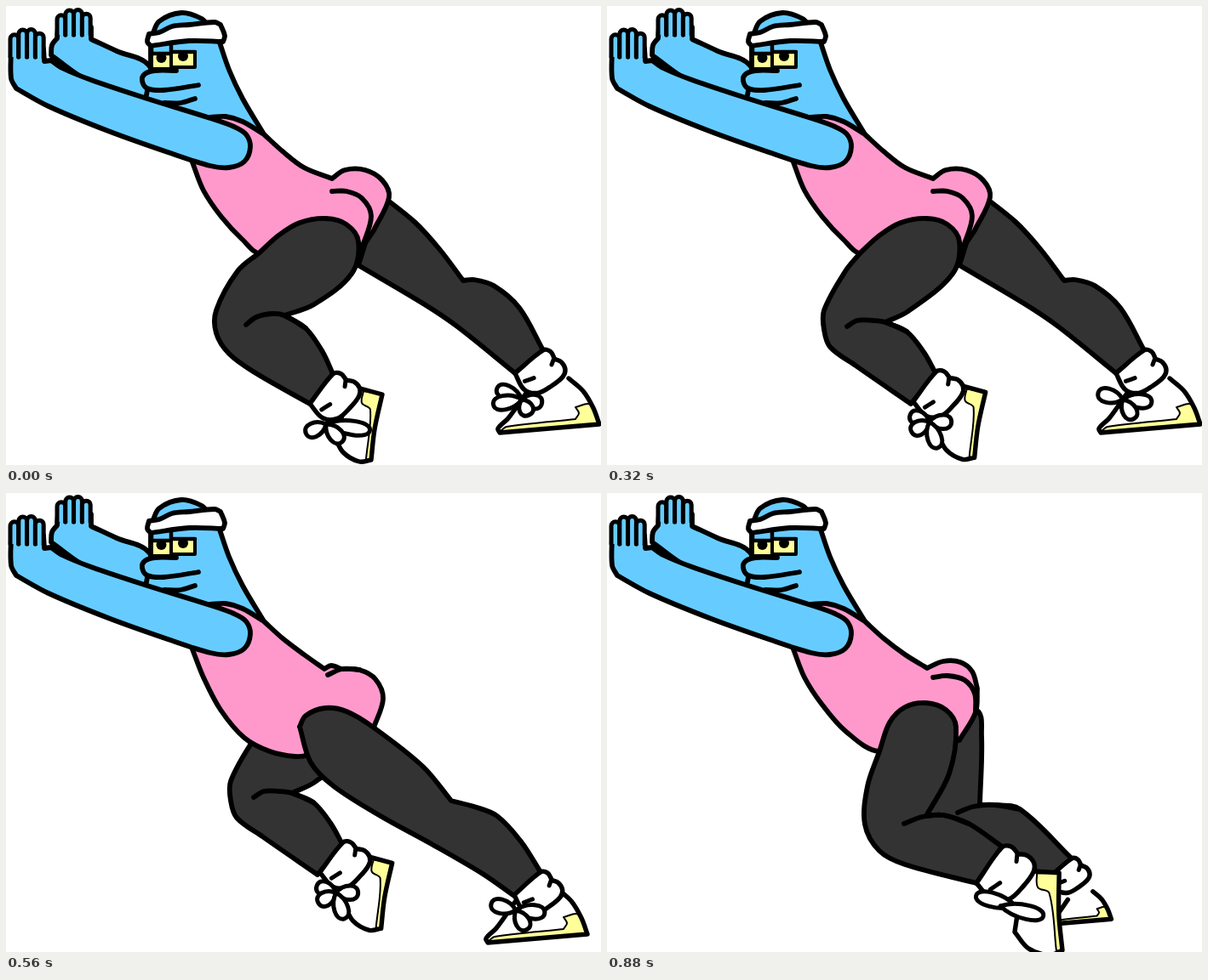
Recreate the animation shown at these times as an HTML page with a canvas. Size 699 by 540 pixels, loop 960 ms.

```html
<!DOCTYPE html>
<html lang="en">
<head>
<meta charset="utf-8">
<title>Skater</title>
<style>
  html, body { margin: 0; width: 100%; height: 100%; overflow: hidden; background: #fff; }
  canvas { display: block; }
</style>
</head>
<body>
<canvas id="stage" width="699" height="540"></canvas>
<script>
const ctx = document.getElementById('stage').getContext('2d');
const BLUE = '#66ccff', PINK = '#ff99cc', DARK = '#333333', YELLOW = '#ffff99', WHITE = '#ffffff', BLACK = '#000000';
const STEP = 80, HALF = 6;
const rad = degrees => degrees * Math.PI / 180;
let zoom = 1;

// Smooth curve through "x,y" key points; a slash makes a sharp corner.
function trace(text) {
  const path = new Path2D();
  let last = null;
  for (const part of text.split('/')) {
    const run = part.trim().split(/\s+/).map(pair => pair.split(',').map(Number));
    if (last) run.unshift(last); else path.moveTo(...run[0]);
    const handle = (i, reach) => {
      const [x0, y0] = run[Math.max(i - 1, 0)];
      const [x1, y1] = run[Math.min(i + 1, run.length - 1)];
      const k = reach / (Math.hypot(x1 - x0, y1 - y0) || 1);
      return [run[i][0] + (x1 - x0) * k, run[i][1] + (y1 - y0) * k];
    };
    for (let i = 0; i < run.length - 1; i++) {
      const [a, b] = [run[i], run[i + 1]];
      const reach = Math.hypot(b[0] - a[0], b[1] - a[1]) / 3;
      path.bezierCurveTo(...handle(i, reach), ...handle(i + 1, -reach), ...b);
    }
    last = run[run.length - 1];
  }
  return path;
}

const toPath = outline => typeof outline === 'string' ? trace(outline) : outline;

function fill(outline, color) {
  ctx.fillStyle = color;
  ctx.fill(toPath(outline));
}

function line(outline, width = 5.8) {
  ctx.lineWidth = width / zoom;
  ctx.stroke(toPath(outline));
}

function shape(outline, color, width) {
  const path = toPath(outline);
  fill(path, color);
  line(path, width);
}

// Line widths stay the same however the part is scaled.
function placed(x, y, draw, angle = 0, scale = 1) {
  ctx.save();
  ctx.translate(x, y);
  ctx.rotate(rad(angle));
  ctx.scale(scale, scale);
  zoom *= scale;
  draw();
  zoom /= scale;
  ctx.restore();
}

function drawShoe(upper, sole) {
  fill(upper, WHITE);
  shape(sole, YELLOW, 2);
  line(upper, 5.4);
}

// Both shoes have the tip of the toe at the origin.
const sideShoe = () => drawShoe(
  '83,-62 100,-47 112,-27 119,-8 / 2,2 / 0,-3 12,-15 34,-46',
  '4,-1 10,-5 91,-14 / 95,-21 91,-28 / 109,-31 119,-8 / 2,2');
const heelShoe = () => drawShoe(
  '-20,-86 13,-77 / 4,-36 0,0 / -14,2 -33,-9 -43,-28 / -34,-52',
  '-9,-81 -11,-67 -1,-59 -6,-1 / 0,0 4,-36 13,-77 / -9,-81');

// The sock hangs from the two corners of the ankle.
function drawSock(ax, ay, bx, by) {
  const angle = Math.atan2(by - ay, bx - ax) * 180 / Math.PI;
  placed(ax, ay, () => {
    shape('0,0 / 44,0 50,7 48,17 / 52,25 50,35 42,40 25,40 6,36 -4,22 0,0', WHITE, 5.4);
    line('48,16 41,20', 5);
    line('3,15 14,19', 5);
  }, angle, Math.hypot(bx - ax, by - ay) / 44);
}

// Lace loops as [angle, length] around the knot.
function drawBow(x, y, loops) {
  for (const [angle, length] of loops) {
    placed(x, y, () => {
      const petal = new Path2D();
      petal.bezierCurveTo(0, 0, 0, 0, 0, 0);
      petal.bezierCurveTo(length * 0.35, -11, length, -11, length, 0);
      petal.bezierCurveTo(length, 11, length * 0.35, 11, 0, 0);
      shape(petal, WHITE, 5);
    }, angle);
  }
}

// Laces fly up, fall level and drop, over and over.
const flatBows = [
  [[205, 32], [170, 34], [10, 24], [65, 20]],
  [[195, 30], [5, 34], [60, 26]],
  [[195, 30], [70, 30]]
];
const bentBows = [
  [[155, 26], [8, 52], [48, 28]],
  [[200, 24], [150, 24], [0, 26], [72, 32]],
  [[150, 32], [-5, 24], [25, 26]]
];

function drawBentLeg(beat) {
  const lift = beat ? 8 : 0;
  shape(`298,290 320,270 345,255 376,250 400,257 414,277 406,315 ${362 - lift},${351 + lift} 327,${364 + lift}
    / 352,${379 + lift / 2} 372,407 ${384 + lift / 3},433 / 357,468 / 292,${431 - lift} 262,${409 - lift}
    ${247 + lift},${385 - lift / 2} ${247 + lift},358 ${272 + lift},312 298,290`, DARK);
  line(`282,${375 + lift / 4} 294,${366 + lift / 2} 312,${362 + lift} 327,${364 + lift} 352,${379 + lift / 2}`);
  placed(lift / 3, -lift / 3, () => {
    placed(429, 534, heelShoe);
    drawSock(357, 468, 384, 433);
    drawBow(376, 492, bentBows[beat % 3]);
  });
}

// Collar and back are shared; the hips and belly follow the stride.
function drawTorso(hips, belly, cheek) {
  shape(`240,131 258,130 278,136 303,151 / 325,171 350,190 ${hips} / ${belly} 232,217 219,184 / 240,131`, PINK);
  line(cheek);
}

function strideFar(beat) {
  shape('440,222 480,254 510,287 537,323 / 550,322 573,329 603,355 631,405 / 598,432 / 530,377 490,350 414,305 / 440,222', DARK);
  placed(578, 500, sideShoe);
  drawSock(598, 432, 631, 405);
  drawBow(606, 463, flatBows[beat % 3]);
  drawTorso('383,203 / 398,193 422,193 442,205 450,225 432,264 / 418,285',
    '300,292 278,275 253,248', '383,218 400,218 418,226 429,247 418,285');
  drawBentLeg(beat);
}

function strideNear(beat) {
  placed(9, -19, () => drawBentLeg(beat));
  drawTorso('374,207 / 382,203 394,207 / 415,208 434,219 443,242 432,276',
    '355,308 340,310 310,304 280,288 252,255', '378,214 395,207 415,208');
  shape('345,275 352,262 375,253 400,257 432,276 490,322 523,362 / 550,369 577,380 605,410 628,446 / 597,474 / 560,448 500,413 440,380 385,345 358,317 345,275', DARK);
  placed(564, 527, sideShoe);
  drawSock(597, 473, 628, 446);
  drawBow(599, 491, flatBows[beat % 3]);
}

function drawPassTorso() {
  drawTorso('376,206 / 395,198 415,199 429,210 435,230 / 433,258 414,291',
    '320,304 280,280 252,248', '383,217 400,215 420,220 432,236 433,258');
}

function passNear() {
  shape('410,260 / 437,238 433,275 418,315 / 410,260', DARK);
  shape('400,345 430,344 455,354 489,378 / 476,400 / 400,400 / 400,345', DARK);
  placed(566, 500, heelShoe, -15, 1.17);
  drawSock(468, 410, 489, 378);
  drawPassTorso();
  shape('321,305 335,265 355,250 375,247 398,255 412,280 415,320 415,384 / 450,387 480,404 521,450 / 483,471 / 440,461 390,447 352,425 328,375 321,305', DARK);
  line('388,393 405,386 425,384 450,387');
  placed(447, 527, sideShoe);
  drawSock(483, 471, 521, 450);
  drawBow(488, 488, [[210, 26], [180, 42], [110, 20], [65, 20]]);
}

function passFar() {
  shape('400,270 / 433,255 440,285 438,367 / 455,367 485,372 546,430 / 520,452 / 460,425 375,385 / 400,270', DARK);
  line('412,376 430,369 455,367 485,372');
  placed(521, 506, sideShoe, 0, 0.6);
  drawSock(520, 452, 546, 430);
  drawPassTorso();
  shape('320,304 332,270 350,252 375,247 398,255 410,275 402,330 375,380 / 395,379 425,389 464,416 / 434,459 / 350,437 320,421 303,390 306,345 320,304', DARK);
  line('349,389 370,381 395,379 425,389');
  placed(535, 538, heelShoe, -12, 1.17);
  drawSock(434, 459, 464, 417);
  drawBow(480, 486, [[195, 48]]);
  drawBow(462, 486, [[13, 52]]);
}

// Four rounded fingers side by side, open at the palm.
function drawFingers(left, top, base) {
  const r = 4.9;
  for (let i = 0; i < 4; i++) {
    const x = left + r * (2 * i + 1);
    const finger = new Path2D();
    finger.moveTo(x - r, base);
    finger.arc(x, top + 2.6 * (i - 1.6) ** 2, r, Math.PI, 0);
    finger.lineTo(x + r, base);
    shape(finger, BLUE, 5);
  }
}

function drawFarArm() {
  shape('61,25 60,38 / 54,46 53,58 / 100,90 180,115 / 168,70 130,53 100,39 / 100,25 / 61,25', BLUE);
  drawFingers(60, 9, 34);
}

function drawNearArm() {
  shape('6,50 6,85 12,97 / 50,118 120,147 190,172 240,188 262,190 280,183 287,166 282,151 268,142 240,132 166,109 100,87 66,73 53,64 / 45,65 / 44,50 / 6,50', BLUE);
  drawFingers(5, 32, 60);
}

function drawEye(x, y, width) {
  const eye = new Path2D();
  eye.rect(x, y, width, 18);
  shape(eye, YELLOW, 4);
  const pupil = new Path2D();
  pupil.arc(x + width / 2, y + 5, 6, 0, Math.PI * 2);
  fill(pupil, BLACK);
  line(`${x},${y - 8} / ${x},${y} / ${x + width},${y}`, 4.5);
}

function drawHead() {
  shape('170,40 170,78 / 164,110 / 240,150 / 303,151 / 278,109 262,75 250,40', BLUE);
  shape('172,34 180,18 206,8 230,15 238,24', BLUE);
  shape('200,76 175,76 163,80 160,88 166,97 185,99 226,93', BLUE);
  line('186,114 205,114 222,109');
  drawEye(171, 56, 23);
  drawEye(194, 54, 28);
  fill('203,80 / 222,74 / 226,90 / 200,94', BLUE);
  shape('168,33 180,31 195,24 215,22 245,19 252,22 / 257,35 255,42 / 215,41 170,47 / 166,42 168,33', WHITE);
}

function draw(time) {
  const step = Math.floor(time / STEP) % (2 * HALF);
  const beat = step % HALF;
  const [stride, pass] = step < HALF ? [strideFar, passNear] : [strideNear, passFar];
  ctx.fillStyle = WHITE;
  ctx.fillRect(0, 0, 699, 540);
  ctx.strokeStyle = BLACK;
  ctx.lineCap = ctx.lineJoin = 'round';
  drawFarArm();
  drawHead();
  if (beat === HALF - 1) pass(); else stride(beat);
  drawNearArm();
}

const start = performance.now();
function tick() {
  draw(performance.now() - start);
  requestAnimationFrame(tick);
}
tick();
</script>
</body>
</html>
```
